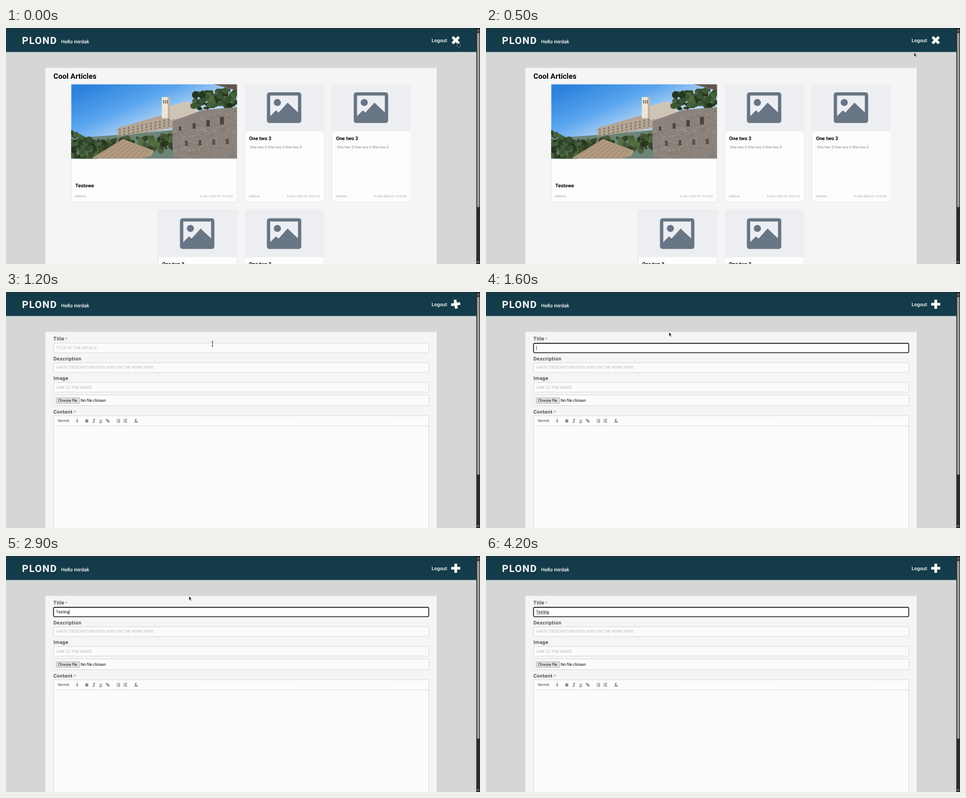
An HTML page with a canvas for the animation above (4.3 s loop, 800x400 px).

```html
<!DOCTYPE html>
<html lang="en">
<head>
<meta charset="utf-8">
<title>Blog editor</title>
<style>
html, body { margin: 0; width: 100%; height: 100%; overflow: hidden; background: #d6d6d6; }
canvas { display: block; }
</style>
</head>
<body>
<canvas id="stage" width="800" height="400"></canvas>
<script>
const ctx = document.getElementById('stage').getContext('2d');
ctx.textRendering = 'geometricPrecision';

const LOOP = 4300, STEP = 100;
const FORM_AT = 600, FOCUS_AT = 1500, TYPE_AT = 1800, HIDE_AT = 3600, MARK_AT = 3900;
const ROBOTO = 'Roboto, Arial, sans-serif';
const SANS = '"Liberation Sans", Arial, sans-serif';
const SLATE = '#687585', INK = '#333', EDGE = '#d3d3d3';
const SMALL = 6.67, BASE = 8.33;
const LEFT = 80.3, WIDE = 633.2;

function rect(x, y, w, h, fill) {
  ctx.fillStyle = fill;
  ctx.fillRect(x, y, w, h);
}

function box(x, y, w, h, r, fill, stroke, line = 0.8) {
  ctx.beginPath();
  ctx.roundRect(x, y, w, h, r);
  if (fill) { ctx.fillStyle = fill; ctx.fill(); }
  if (stroke) { ctx.strokeStyle = stroke; ctx.lineWidth = line; ctx.stroke(); }
}

function poly(pts, fill) {
  ctx.beginPath();
  for (let i = 0; i < pts.length; i += 2) ctx.lineTo(pts[i], pts[i + 1]);
  ctx.closePath();
  ctx.fillStyle = fill;
  ctx.fill();
}

function disc(x, y, r, fill) {
  ctx.beginPath();
  ctx.arc(x, y, r, 0, 7);
  ctx.fillStyle = fill;
  ctx.fill();
}

function line(x1, y1, x2, y2, color = INK, width = 0.8) {
  ctx.beginPath();
  ctx.moveTo(x1, y1);
  ctx.lineTo(x2, y2);
  ctx.strokeStyle = color;
  ctx.lineWidth = width;
  ctx.stroke();
}

function text(str, x, y, size, weight, color, { gap = 0, align = 'left', family = ROBOTO } = {}) {
  ctx.font = `${weight} ${size}px ${family}`;
  ctx.letterSpacing = gap + 'px';
  ctx.textAlign = align;
  ctx.fillStyle = color;
  ctx.fillText(str, x, y);
}

function at(x, y, angle, paint) {
  ctx.save();
  ctx.translate(x, y);
  ctx.rotate(angle);
  paint();
  ctx.restore();
}

function seeded(seed) {
  return () => (seed = seed * 16807 % 2147483647) / 2147483647;
}

const clamp = v => Math.min(1, Math.max(0, v));
const smooth = u => u * u * (3 - 2 * u);

function header(t) {
  rect(0, 0, 794, 40.6, '#133b49');
  rect(0, 0, 800, 1, '#252a2d');
  text('PLOND', 27, 27, 16.67, 700, '#fff', { gap: 1.25 });
  text('Hello mirdak', 93, 26, BASE, 500, '#fff');
  text('Logout', 718.3, 24, BASE, 500, '#fff');

  // the cross eases round into a plus
  const left = 1 - clamp((t - 650) / 1000);
  at(759, 20.7, -Math.PI / 4 * left ** 2, () => {
    box(-7.7, -2.3, 15.4, 4.6, 0.6, '#fff');
    box(-2.3, -7.7, 4.6, 15.4, 0.6, '#fff');
  });
}

function scrollbar(end) {
  rect(793.75, 0, 6.25, 400, '#2b2b2b');
  box(795, 8, 4, end - 8, 2, '#9b9b9b');
  poly([795, 5.5, 799, 5.5, 797, 2.5], '#9b9b9b');
  poly([795, 395.5, 799, 395.5, 797, 398.5], '#9b9b9b');
}

function cardBase(x, y, w, date) {
  ctx.save();
  ctx.shadowColor = 'rgba(0,0,0,.2)';
  ctx.shadowBlur = 1.5;
  ctx.shadowOffsetY = 0.4;
  rect(x, y, w, 199, '#fdfdfd');
  ctx.restore();
  text('MIRDAK', x + 6.5, y + 191.3, 5, 400, '#a6a6a6');
  text('8 JULY 2025 AT ' + date, x + w - 7, y + 191.3, 5, 400, '#a6a6a6', { align: 'right' });
}

function card(x, y, date) {
  cardBase(x, y, 132.7, date);
  rect(x, y, 132.7, 79.5, '#eceef2');
  at(x, y, 0, () => {
    box(39.3, 16.3, 52.5, 46.5, 1.5, null, SLATE, 5.6);
    disc(54.2, 30.8, 6, SLATE);
    poly([41, 61, 41, 55, 52, 44, 56, 48, 71.5, 31, 90, 48.5, 90, 61], SLATE);
  });
  text('One two 3', x + 6.5, y + 94, BASE, 700, '#000');
  text('One two 3 One two 3 One two 3', x + 8.2, y + 108.7, 6.25, 500, '#9c9c9c');
}

// leaves scattered along a slope
function foliage(rnd, n, x, y, w, h, slope, hue) {
  for (let i = 0; i < n; i++) {
    const u = rnd();
    disc(x + u * w, y + u * slope + rnd() * h, 2 + rnd() * 4, `hsl(${hue} 25% ${15 + rnd() * 20}%)`);
  }
}

function photo() {
  const rnd = seeded(41);
  ctx.save();
  ctx.beginPath();
  ctx.rect(110.3, 95.5, 279.5, 125.7);
  ctx.clip();

  const sky = ctx.createLinearGradient(150, 95, 190, 190);
  sky.addColorStop(0, '#2b82dc');
  sky.addColorStop(0.55, '#5aa5ee');
  sky.addColorStop(1, '#b5d5f5');
  rect(110, 95, 280, 127, sky);

  poly([110, 187, 190, 181, 290, 172, 290, 222, 110, 222], '#6d8478');
  foliage(rnd, 160, 135, 192, 150, 26, -12, 95);

  // long convent with rows of windows, then the church and tower
  poly([187, 170, 262, 148, 305, 140, 305, 166, 189, 184], '#b3a593');
  for (let i = 0; i < 36; i++) {
    const col = i % 12, row = Math.floor(i / 12);
    rect(191 + col * 7.5, 171 - col * 1.5 + row * 4.8, 2.3, 2.6, '#776c60');
  }
  poly([276, 132, 308, 124, 321, 134, 321, 148, 276, 156], '#cfc5b6');
  rect(263, 117, 10, 36, '#ebe5da');
  rect(273, 117, 4, 36, '#bfb5a7');
  for (let i = 0; i < 3; i++) rect(265 + i * 3.2, 122, 1.6, 6, '#756c62');

  foliage(rnd, 130, 316, 112, 72, 28, -8, 105);
  poly([350, 95, 390, 95, 390, 106], '#685348');

  // stone wall with seeded blocks and a few windows
  poly([281, 158, 332, 139, 390, 134, 390, 222, 281, 222], '#8b837b');
  for (let i = 0; i < 170; i++) {
    const x = 281 + rnd() * 104, top = 158 - (x - 281) * 0.2;
    rect(x, top + rnd() * (222 - top), 5, 2, `hsl(28 9% ${42 + rnd() * 20}% / .7)`);
  }
  for (let i = 0; i < 4; i++) {
    rect(292 + i * 23, 167 - i * 5.5, 4 + i, 7 + i * 2, '#51433e');
    rect(302 + i * 23, 191 - i, 5, 9, '#5c5049');
  }

  foliage(rnd, 110, 106, 174, 46, 42, 18, 105);
  poly([143, 222, 197, 188, 250, 208, 246, 216, 228, 222], '#b29a80');
  for (let i = 0; i < 9; i++) line(197 + i * 5.5, 189 + i * 2.2, 150 + i * 10, 222, 'rgba(95,76,61,.35)', 1);
  ctx.restore();
}

function articles() {
  text('Cool Articles', 80, 86, 12.5, 700, '#000');
  cardBase(110.3, 95.5, 279.5, '17:29:52');
  photo();
  text('Testowe', 117, 269.6, BASE, 700, '#000');
  card(403.8, 95.5, '15:37:43');
  card(550.4, 95.5, '15:37:40');
  card(257.1, 309, '15:37:36');
  card(403.8, 309, '15:37:32');
  scrollbar(304);
}

function label(str, y, starX) {
  text(str, 80, y, BASE, 500, INK, { gap: 0.42 });
  if (starX) text('*', starX, y, 7, 500, '#777');
}

function field(y, hint) {
  box(LEFT, y, WIDE, 16.4, 2, '#fbfbfb', EDGE);
  text(hint, 84.6, y + 10.4, SMALL, 500, '#c8c8c8');
}

function tools() {
  text('Normal', 87.4, 220.3, 5.83, 500, INK, { family: SANS });
  for (const s of [-1, 1])
    poly([118.6, 218.3 + s * 0.7, 121.8, 218.3 + s * 0.7, 120.2, 218.3 + s * 2.7], INK);
  text('B', 136.5, 220.8, 7, 700, INK, { align: 'center', family: SANS });
  text('U', 159.7, 220, 6, 400, INK, { align: 'center', family: SANS });
  line(157.2, 221.3, 162.2, 221.3);
  // slanted strokes shared by the italic and clear buttons
  for (const x of [148.3, 218.6]) {
    line(x - 1, 215.9, x + 2, 215.9);
    line(x + 0.5, 215.9, x - 0.5, 220.8);
    line(x - 2, 220.8, x + 1, 220.8);
  }
  line(220, 218.8, 222.2, 221);
  line(222.2, 218.8, 220, 221);
  at(171.7, 218.3, Math.PI / 4, () => {
    for (const x of [-3.2, -0.2]) box(x, -1.3, 3.4, 2.6, 1.3, null, INK);
  });
  for (const x of [189.5, 201.2])
    for (let y = 216; y < 221; y += 2.3) {
      line(x - 1, y, x + 3, y);
      line(x - 3, y, x - 2, y);
    }
}

function titleInput(t) {
  box(LEFT, 87, WIDE, 15.8, 2, '#fdfdfd', '#111', 1.3);
  const count = Math.max(0, (t - TYPE_AT) / STEP + 1);
  const word = 'Testing', typed = word.slice(0, count);
  text(typed, 84.6, 97, SMALL, 400, '#000');
  const end = 84.6 + ctx.measureText(typed).width;

  // the caret blinks unless a key was just pressed
  const typing = count > 0 && count <= word.length;
  const idle = t - (count > 0 ? TYPE_AT + STEP * word.length : FOCUS_AT);
  if (typing || idle % 1000 < 500) rect(end + 0.2, 91, 0.6, 7.8, '#000');
  if (t >= MARK_AT) line(84.6, 98.4, end, 98.4, '#444', 0.6);
}

function form(t) {
  label('Title', 82, 100.5);
  if (t >= FOCUS_AT) titleInput(t); else field(86.7, 'TITLE OF THE ARTICLE');
  label('Description', 115.5);
  field(120, 'SHORT DESCRIPTION DISPLAYED ON THE HOME PAGE');
  label('Image', 149);
  field(153.2, 'LINK TO THE IMAGE');
  box(LEFT, 174.4, WIDE, 18.4, 2, '#fbfbfb', EDGE);
  box(84.7, 179.2, 39.7, 9.2, 1, '#e9e9e9', '#8a8a8a', 0.7);
  text('Choose file', 87.5, 186, SMALL, 400, '#000');
  text('No file chosen', 126.3, 186, SMALL, 400, '#000');
  label('Content', 205.5, 114.5);
  box(LEFT, 209.8, WIDE, 200, 0, '#fcfcfc', EDGE);
  line(LEFT, 227, LEFT + WIDE, 227, EDGE);
  tools();
  scrollbar(310);
}

function outlined(pts) {
  poly(pts, '#111');
  ctx.strokeStyle = 'rgba(255,255,255,.85)';
  ctx.lineWidth = 0.5;
  ctx.stroke();
}

function hand() {
  outlined([0, 0, 1.1, 0, 1.5, 2.8, 4.8, 3.4, 4.2, 8, 1, 8, -1.6, 5, 0.2, 5]);
}

function beam() {
  line(0, -4, 0, 4);
  for (const y of [-4, 4]) line(-1.8, y, 1.8, y);
}

function arrow() {
  outlined([0, 0, 0, 6.8, 1.4, 5.5, 2.6, 8.2, 3.6, 7.7, 2.5, 5.1, 4.5, 5]);
}

function pointer(t) {
  if (t >= HIDE_AT) return;
  const s = smooth(clamp((t - 300) / 1100));
  const x = 762 - 453 * s;
  const y = t > FOCUS_AT ? 68 : 88 - 64 * (1 - s) ** 3.5;
  const overField = y > 86.5;
  at(x, y, 0, x > 751 ? hand : overField ? beam : arrow);
}

const start = performance.now();

function draw(now) {
  const t = Math.floor(Math.max(0, now - start) % LOOP / STEP) * STEP;
  rect(0, 0, 800, 400, '#d6d6d6');
  header(t);
  rect(66.5, 67.5, 660.5, 333, '#f5f5f5');
  if (t < FORM_AT) articles(); else form(t);
  pointer(t);
  requestAnimationFrame(draw);
}

requestAnimationFrame(draw);
</script>
</body>
</html>
```
